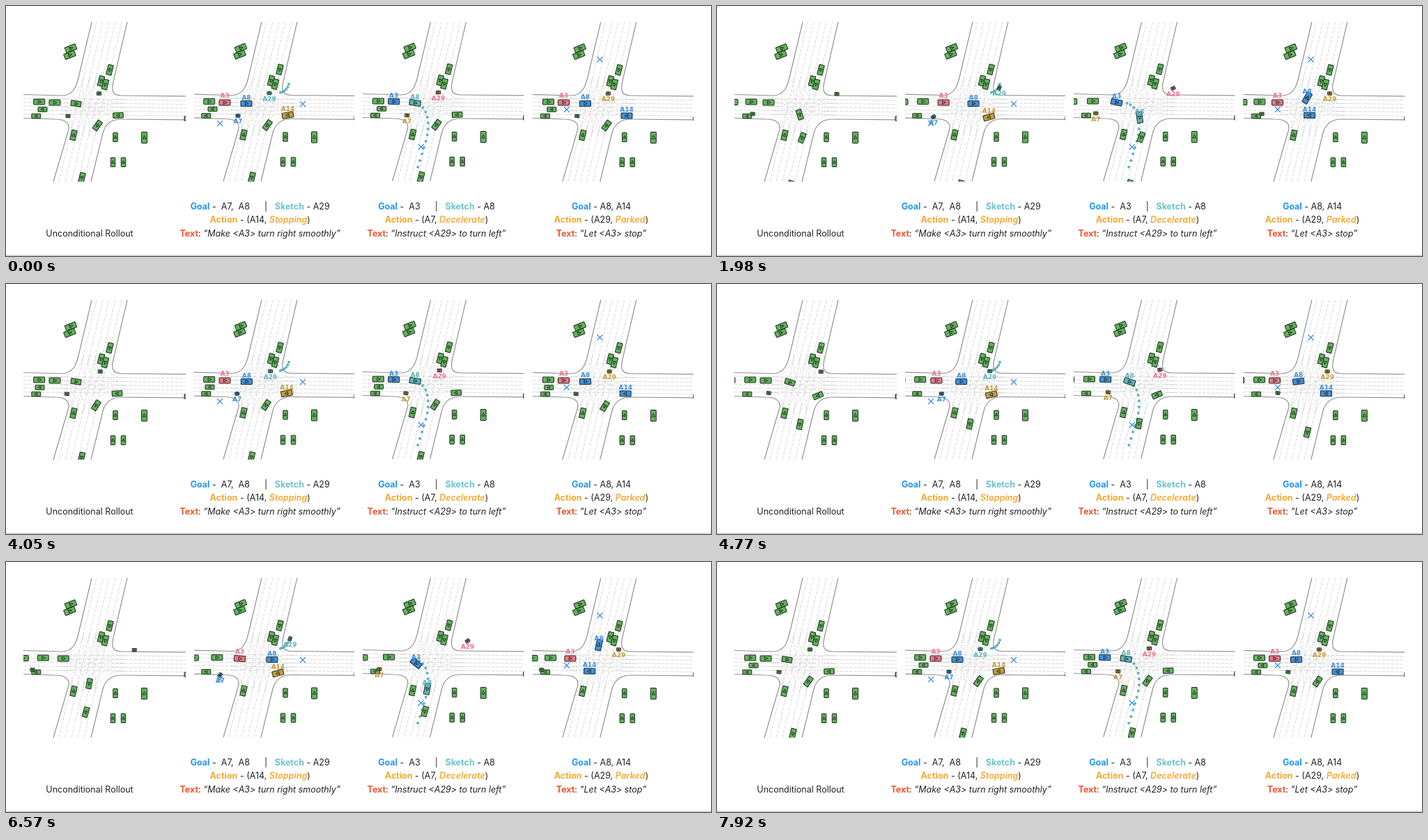
An HTML page that plays this animation: 1012 by 360 pixels, repeating every 8000 ms.

```html
<!DOCTYPE html>
<html lang="en">
<head>
<meta charset="utf-8">
<title>Traffic rollouts</title>
<style>
  html, body { margin: 0; width: 100%; height: 100%; overflow: hidden; background: #fff; }
  svg { display: block; }
  .edge { fill: none; stroke: #929292; stroke-width: 1.2; }
  .lane { fill: none; stroke: #cacaca; stroke-width: .7; stroke-dasharray: 5 1.6; }
  .turn { fill: none; stroke: #cbcbcb; stroke-width: .6; stroke-dasharray: 3 1.5; }
  .car { stroke: #1b2a1b; stroke-width: 1; }
  .tag { font: bold 9px "DejaVu Sans", sans-serif; text-anchor: middle; }
  .cross { stroke: #3f8fe0; stroke-width: 1.2; }
  .cap { font: 12.5px Inter, sans-serif; fill: #222; text-anchor: middle; white-space: pre; }
  .goal, .sketch, .action, .text { font-weight: 700; }
  .goal { fill: #2196f0; }
  .sketch { fill: #6cc3cd; }
  .action, .verb { fill: #f5a832; }
  .text { fill: #ee5530; }
  .verb { font-style: italic; font-weight: 600; }
  .say { font-style: italic; }
</style>
</head>
<body>
<svg id="stage" width="1012" height="360" viewBox="0 0 1012 360">
  <defs><g id="scene"></g></defs>
</svg>
<script>
const NS = "http://www.w3.org/2000/svg";
const stage = document.getElementById("stage");
const scene = document.getElementById("scene");
const defs = stage.querySelector("defs");
const GREEN = "#62b25c", PINK = "#ee748b", BLUE = "#3f8fe0", TEAL = "#5fb3bd", GOLD = "#c49c3c";
const STEP = 90, STEPS = 44, LOOP = 8000;
const LONG = [16, 8], MID = [14.5, 7.5], LOW = [13, 6.5], TINY = [6, 4.5];
const movers = [];

function add(parent, tag, attrs, text) {
  const el = document.createElementNS(NS, tag);
  for (const k in attrs) el.setAttribute(k, attrs[k]);
  if (text) el.textContent = text;
  parent.appendChild(el);
  return el;
}

function place(el, x, y, a) {
  el.setAttribute("transform", `translate(${x.toFixed(2)} ${y.toFixed(2)}) rotate(${a.toFixed(1)})`);
}

function carShape(parent, fill, [w, h]) {
  const g = add(parent, "g", { class: "car", fill });
  add(g, "rect", { x: -w / 2, y: -h / 2, width: w, height: h, rx: .6 });
  const k = h / 8;
  add(g, "path", { d: `M${3 * k} 0L${-1.6 * k} ${-2.3 * k}V${2.3 * k}Z`, "stroke-width": .9 });
  return g;
}

// Road, shared by all panels: the vertical street leans, the other drops slightly
const streetX = (i, y) => 130 + 9 * i - .235 * (y - 23);
const roadY = (i, x) => 133 + 5.6 * i + .0127 * (x - 25);

for (let i = 0; i < 5; i++) {
  add(scene, "path", { class: "lane", d: `M${streetX(i, 23)} 23L${streetX(i, 253)} 253` });
  add(scene, "path", { class: "lane", d: `M25 ${roadY(i, 25)}L262 ${roadY(i, 262)}` });
  for (const x of [78, 170])
    for (const y of [103, 188]) {
      const j = (x < 100) === (y < 130) ? i : 4 - i;
      add(scene, "path", {
        class: "turn",
        d: `M${x} ${roadY(i, x)}Q${streetX(j, 145)} ${roadY(i, 120)} ${streetX(j, y)} ${y}`
      });
    }
}
for (const d of [
  "M123 23L105 99C102 113 98 129 80 129L25 127.5",
  "M174 23L154 109C151 122 153 129 166 129L262 130",
  "M25 161.5L70 163C87 163 93 170 89 181L68 253",
  "M262 164L166 163C149 163 142 172 139 183L122 253"
]) add(scene, "path", { class: "edge", d });

function park(size, angle, ...spots) {
  for (const [x, y] of spots) place(carShape(scene, GREEN, size), x, y, angle);
}
park(LONG, -22, [93, 61], [91.5, 70.5]);
park(MID, 104, [149, 92], [136.5, 108], [142.5, 113]);
park(MID, -77, [97, 186]);
park(LONG, -90, [198.5, 189.5]);
park(LOW, -90, [157, 189], [153.5, 225], [168.5, 225]);
park(LOW, 180, [43.3, 158.5], [262.5, 162]);

function panel(left, right, dx, dy) {
  const id = "clip" + left;
  const clip = add(defs, "clipPath", { id });
  add(clip, "rect", { x: left, y: 23, width: right - left, height: 230 });
  const outer = add(stage, "g", { "clip-path": `url(#${id})` });
  const g = add(outer, "g", { transform: `translate(${dx} ${dy})` });
  add(g, "use", { href: "#scene" });
  return { marks: add(g, "g"), cars: add(g, "g"), tags: add(g, "g") };
}

// Distance travelled after s steps
const cruise = (v, a = 0) => s => v * s + a * s * s;
const launch = (wait, a) => s => a * Math.max(0, s - wait) ** 2;
const brake = (v, stop) => s => {
  const t = Math.min(s, stop);
  return v * t * (1 - t / (2 * stop));
};

function car(p, fill, size, d, drive, tag, lift) {
  const body = carShape(p.cars, fill, size);
  const label = tag && add(p.tags, "text", { class: "tag", fill }, tag);
  movers.push({ body, label, lift, drive, path: add(defs, "path", { d }) });
}

function cross(p, x, y) {
  add(p.marks, "path", { class: "cross", d: `M${x - 4} ${y - 4}l8 8m0 -8l-8 8` });
}

// Sketched route: dots that spread out along a curve
function dots(p, d, n) {
  const path = add(defs, "path", { d }), len = path.getTotalLength();
  for (let i = 0; i < n; i++) {
    const { x, y } = path.getPointAtLength(len * (i / (n - 1)) ** 1.2);
    add(p.marks, "circle", { cx: x, cy: y, r: 2, fill: TEAL });
  }
}

const RIGHT = "M100.5 140.5C112 142 122 152 120 172L99 290";
const LEFT = "M161 157.5C146 158 133 164 127 179.5Q123 187 121 193L90 305";
const BIKE = "M89 158.5L59 155.5L-40 153.5";
const ahead = (x, y) => `M${x} ${y}H300`;

// Uncontrolled traffic that every panel has
function traffic(p, queue, southbound) {
  car(p, GREEN, LONG, ahead(15, 138.5), cruise(.32));
  car(p, GREEN, LONG, ahead(47.7, 138), queue);
  car(p, GREEN, LOW, "M52.5 149H-160", cruise(4));
  car(p, GREEN, MID, "M131.3 172Q121 186 118 208L78 368", southbound);
}
function leaving(p) {
  car(p, GREEN, MID, "M109 247.3L79 372", cruise(2.5));
}
const southbound = cruise(3.3, .038), merge = cruise(1.38, .05), cycle = cruise(1.6, .0056);

const p1 = panel(25, 258, 0, 0);
traffic(p1, launch(14.4, .026), southbound);
leaving(p1);
car(p1, GREEN, LONG, ahead(70, 139), launch(12.7, .046));
car(p1, GREEN, MID, RIGHT, launch(0, .053));
car(p1, GREEN, MID, LEFT, merge);
car(p1, GREEN, TINY, BIKE, cycle);
car(p1, GREEN, TINY, "M133.5 126L262 128", cruise(1.75));

const p2 = panel(270, 500, 244, -.5);
cross(p2, 63, 169.5);
cross(p2, 182, 141.5);
dots(p2, "M150 125Q159 123 162 113", 6);
traffic(p2, launch(11.6, .037), southbound);
leaving(p2);
car(p2, PINK, LONG, "M70 139.5H90Q104 140 130 152", launch(4, .0345), "A3", -10);
car(p2, BLUE, LONG, ahead(101, 141), cruise(.345, .032), "A8", -9);
car(p2, BLUE, TINY, "M89 158.5H72Q64 159 61 168L56 182", cruise(1.3, -.0125), "A7", 8);
car(p2, TEAL, TINY, "M134 126H150Q159 126 162 116L170 92", cruise(1.6, -.0098), "A29", 8);
car(p2, GOLD, LONG, "M160.5 157.7Q152 159 146.5 160.5L138 163", brake(1.6, 18), "A14", -9);

const p3 = panel(512, 743.5, 486.7, -1);
cross(p3, 109, 204);
dots(p3, "M102 141C122 147 122 177 115 199L104.5 233", 13);
traffic(p3, launch(12.2, .054), southbound);
leaving(p3);
car(p3, BLUE, LONG, "M70 138.5L82 139C98 140 112 152 116 170L100 240", launch(4.9, .058), "A3", -9);
car(p3, TEAL, LONG, RIGHT, launch(0, .0635), "A8", -9);
car(p3, GREEN, MID, LEFT, merge);
car(p3, GOLD, TINY, BIKE, cruise(1.7, -.011), "A7", 8);
car(p3, PINK, TINY, "M133.8 125.5Q154 125.5 168 119.5L200 100", cruise(1.8, -.0095), "A29", 8);

const p4 = panel(755, 987, 730.8, 0);
cross(p4, 121.7, 77);
cross(p4, 74, 149);
traffic(p4, launch(18, .026), cruise(4.5, .05));
car(p4, PINK, LONG, ahead(69.7, 139), launch(9, .0234), "A3", -10);
car(p4, BLUE, LONG, "M100.7 140.5Q116 140 119 125L130 75", launch(0, .038), "A8", -9.5);
car(p4, GREEN, TINY, BIKE, cycle);
car(p4, GOLD, TINY, ahead(133.7, 126), brake(1.76, 17), "A29", 8);
car(p4, BLUE, LONG, "M160.2 158L-20 155.3", cruise(1.84), "A14", -9);

// Centred caption line made of [class, text] runs
function caption(x, y, ...runs) {
  const line = add(stage, "text", { x, y, class: "cap" });
  for (const [cls, str] of runs) add(line, "tspan", { class: cls }, str);
}
function captions(x, goal, sketch, agent, verb, say) {
  const first = [["goal", "Goal"], ["", goal]];
  if (sketch) first.push(["", "      |   "], ["sketch", "Sketch"], ["", " - " + sketch]);
  caption(x, 293, ...first);
  caption(x, 312, ["action", "Action"], ["", ` - (${agent}, `], ["verb", verb], ["", ")"]);
  caption(x, 332, ["text", "Text"], ["", ": "], ["say", `“${say}”`]);
}
caption(120, 332, ["", "Unconditional Rollout"]);
captions(364.7, " -  A7,  A8", "A29", "A14", "Stopping", "Make <A3> turn right smoothly");
captions(618, " -  A3", "A8", "A7", "Decelerate", "Instruct <A29> to turn left");
captions(854.5, " - A8, A14", "", "A29", "Parked", "Let <A3> stop");
add(stage, "path", { d: "M0 359.2H1012", stroke: "#b4b4b4", "stroke-width": 1 });

function draw(ms) {
  const s = Math.floor(ms % LOOP / STEP) % STEPS;
  for (const { body, label, lift, drive, path } of movers) {
    const dist = drive(s);
    const { x, y } = path.getPointAtLength(dist);
    const back = path.getPointAtLength(Math.max(0, dist - 1));
    const front = path.getPointAtLength(dist + 1);
    place(body, x, y, Math.atan2(front.y - back.y, front.x - back.x) * 180 / Math.PI);
    if (label) place(label, x, y + lift + 3.2, 0);
  }
}

const start = performance.now();
function tick() {
  draw(performance.now() - start);
  requestAnimationFrame(tick);
}
draw(0);
requestAnimationFrame(tick);
</script>
</body>
</html>
```
